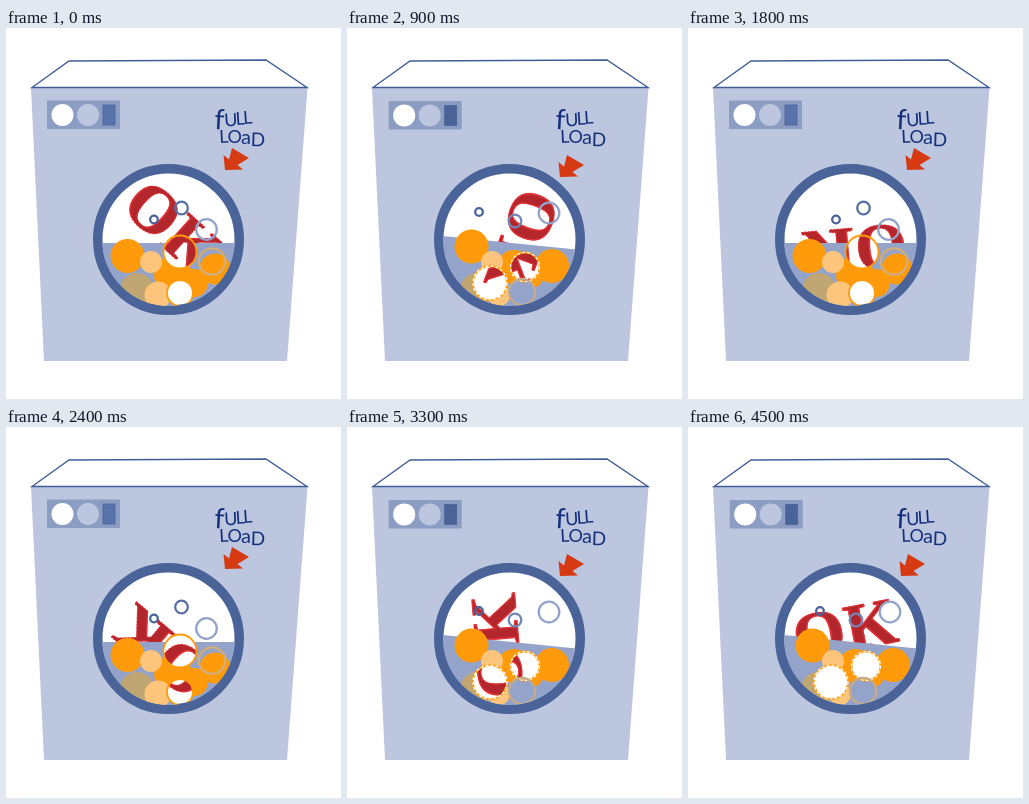
These frames come from a looping animation (335x371 px, 4.8 s). An HTML page:

```html
<!DOCTYPE html>
<html lang="en">
<head>
<meta charset="utf-8">
<title>Full load</title>
<style>
  html, body { margin: 0; width: 100%; height: 100%; overflow: hidden; background: #fff; }
  svg { display: block; width: 335px; height: 371px; }
  .label { font: 18px Lato, sans-serif; fill: #14307c; }
  .word { font: bold 66px "Liberation Serif", serif; text-anchor: middle; letter-spacing: 1px; }
</style>
</head>
<body>
<svg viewBox="0 0 335 371">
  <defs>
    <clipPath id="window"><circle cx="162.5" cy="211.5" r="66.5"/></clipPath>
  </defs>
  <path d="M25 60H301.5L281 333H38Z" fill="#bdc6df"/>
  <path d="M26 59.5L63 33L260 32L301 59.5Z" fill="#fff" stroke="#415d98" stroke-width="1.4"/>
  <g id="panel">
    <path d="M41 72.5H114V101H41Z" fill="#8c9dc3"/>
    <circle cx="56.5" cy="87" r="11" fill="#fff"/>
    <circle cx="82" cy="87" r="11" fill="#bdc6df"/>
    <rect id="button" x="97" y="77" width="12" height="20" stroke="#4a6398" stroke-width=".8"/>
  </g>
  <g class="label">
    <text x="208 218.5 230 237.5" y="101 98.500 97 96" rotate="3 -3 -4 -4"><tspan font-size="28">f</tspan>ULL</text>
    <text x="213.5 221.5 235 244.500" y="115 115 116 118" rotate="-3 0 0 2">LO<tspan font-size="20">a</tspan><tspan font-size="19">D</tspan></text>
  </g>
  <path id="arrow" d="M226 120L243 130L231.5 137L237 141.5L219 142L217.5 127L223 131.5Z" fill="#d63a12"/>
  <circle cx="162.5" cy="211.5" r="70.75" fill="#fff" stroke="#4a6398" stroke-width="9.5"/>
  <g clip-path="url(#window)">
    <g id="word" class="word"></g>
    <g id="washes"></g>
  </g>
</svg>
<script>
const byId = id => document.getElementById(id);
const ORANGE = '#ff9b0a', PEACH = '#fdc57c', TAN = '#bfa673', WATER = '#93a3c9';
const DARK = '#b3262b', BRIGHT = '#e3343a';

// Circles are [x, y, radius, colour]; holes open the liquid onto the drum.
const washes = [
  {
    left: 215, right: 215,
    blobs: [[131, 262, 17, TAN], [167, 247, 19, ORANGE], [188, 255, 14, ORANGE],
            [209, 241, 15.5, ORANGE], [121.5, 228, 17, ORANGE],
            [145, 234, 11, PEACH], [152, 267, 13.5, PEACH]],
    holes: [[174, 224, 16.5], [174, 265, 13]],
    rings: [[148, 191.5, 3.8, '#4a6398'], [175.5, 180, 6.3, '#5870a5'],
            [200.5, 201.5, 10.3, WATER], [206, 233.5, 13.2, '#d2ad78']]
  },
  {
    left: 231, right: 208,
    blobs: [[130, 260, 17, TAN], [167, 239, 17, ORANGE], [190, 256, 11, ORANGE],
            [210, 227, 17, ORANGE], [136, 226, 17, ORANGE],
            [145, 234, 11, PEACH], [153, 267, 13, PEACH]],
    holes: [[143, 255, 17], [174, 265, 13]], dashed: true,
    rings: [[146, 180, 3.8, '#4a6398'], [168, 193, 6.3, '#7187b8'],
            [201, 201.5, 10.3, WATER]]
  },
  {
    left: 208, right: 221.5,
    blobs: [[130, 262, 17, TAN], [167, 239, 17, ORANGE], [184, 247, 13, ORANGE],
            [205, 238, 17, ORANGE], [124.5, 218.5, 17, ORANGE],
            [145, 234, 11, PEACH], [152, 267, 11, PEACH], [175, 264, 13, WATER]],
    holes: [[143, 255, 17], [178, 239, 14.5]], dashed: true,
    rings: [[132, 184, 3.8, '#4a6398'], [168, 193, 6.3, '#7187b8'],
            [202, 185, 10.3, WATER], [175, 264, 13, '#c5ab88']]
  }
];
const order = [0, 1, 0, 2];

// Step, centre x, centre y, rotation in degrees
const poses = [
  [0, 168, 200, 42], [2, 173, 209, 91], [4, 177, 220, 130], [8, 155, 224, 220],
  [11, 150, 218, 265], [13, 151, 208, 307], [15, 158, 202, 349], [16, 168, 200, 402]
];

const circle = ([x, y, r], paint) => `<circle cx="${x}" cy="${y}" r="${r}" ${paint}/>`;
const outline = (c, colour, width, dash = '') =>
  circle(c, `fill="none" stroke="${colour}" stroke-width="${width}" stroke-dasharray="${dash}"`);

function washMarkup(wash, i) {
  const { left, right, blobs, holes, rings, dashed } = wash;
  return `<g>
    <mask id="liquid${i}" maskUnits="userSpaceOnUse" x="90" y="140" width="150" height="150">
      <path d="M90 140H240V290H90Z" fill="#fff"/>
      ${holes.map(h => circle(h, 'fill="#000"')).join('')}
    </mask>
    <g mask="url(#liquid${i})">
      <path d="M96 ${left}L229 ${right}V290H96Z" fill="${WATER}"/>
      ${blobs.map(b => circle(b, `fill="${b[3]}"`)).join('')}
    </g>
    ${holes.map(h => outline(h, ORANGE, 1.8) + (dashed ? outline(h, '#fff', 1.2, '3 2') : '')).join('')}
    ${rings.map(r => outline(r, r[3], 2.3)).join('')}
  </g>`;
}

byId('washes').innerHTML = washes.map(washMarkup).join('');
const copy = (dx, paint) => `<text x="${dx}" y="22" ${paint}>OK</text>`;
byId('word').innerHTML = copy(-1.5, `fill="${BRIGHT}"`) + copy(0, `fill="${DARK}"`) +
  copy(-.5, `id="edge" fill="none" stroke="${BRIGHT}" stroke-width="1.2"`);
const layers = [...byId('washes').children];

function poseAt(step) {
  const next = poses.findIndex(p => p[0] > step);
  const a = poses[next - 1], b = poses[next];
  const k = (step - a[0]) / (b[0] - a[0]);
  return a.map((v, i) => v + (b[i] - v) * k);
}

let shown = -1;
function draw(step) {
  const active = order[step % 4], shaken = active > 0;
  layers.forEach((layer, i) => layer.style.display = i === active ? '' : 'none');
  const [, x, y, angle] = poseAt(step);
  byId('word').setAttribute('transform', `translate(${x} ${y}) rotate(${angle})`);
  byId('edge').setAttribute('stroke-dasharray', shaken ? 'none' : '2 1.5');
  byId('panel').setAttribute('transform', shaken ? 'translate(.7 .4)' : '');
  byId('arrow').setAttribute('transform', shaken ? 'translate(-6 7)' : '');
  byId('button').setAttribute('fill', shaken ? '#4a6398' : '#5873ac');
}

function tick() {
  const step = Math.floor(performance.now() % 4800 / 300);
  if (step !== shown) draw(shown = step);
  requestAnimationFrame(tick);
}
tick();
</script>
</body>
</html>
```
